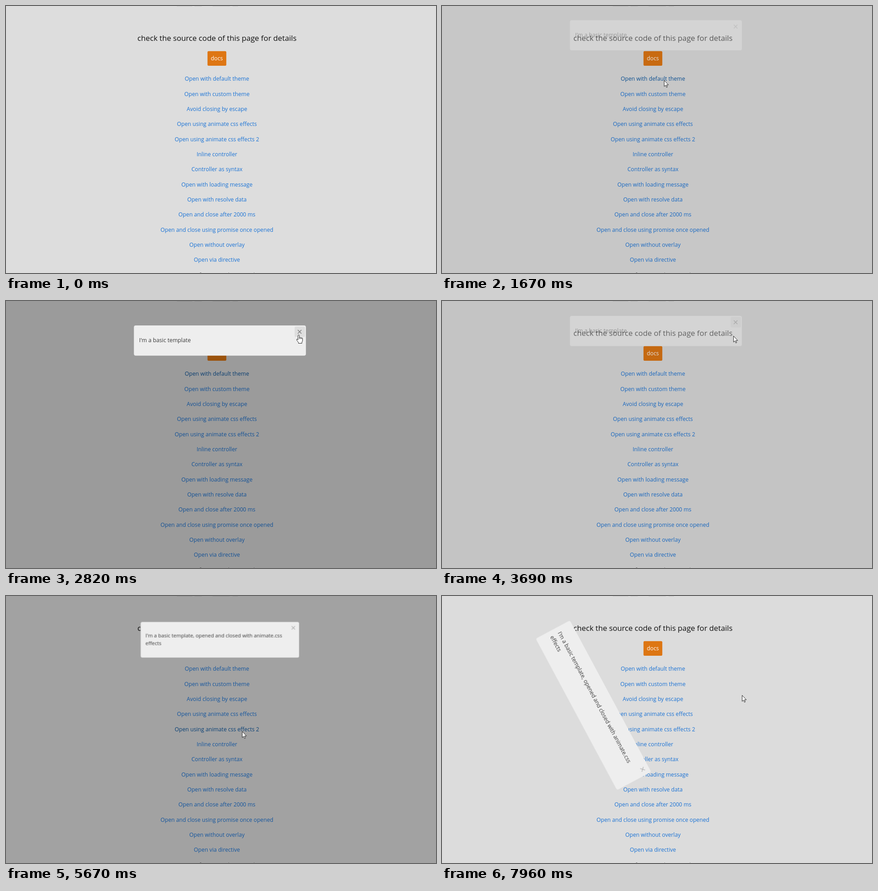
These frames come from a looping animation (949 px wide and 590 px high, 8 s). An HTML page:

```html
<!DOCTYPE html>
<html lang="en">
<head>
<meta charset="utf-8">
<title>Dialog demo</title>
<style>
  html, body { margin: 0; width: 100%; height: 100%; overflow: hidden; background: #ddd; }
  svg { display: block; width: 100%; height: 100%; }
  text { font: 12.2px "Open Sans", "Noto Sans", sans-serif; }
  .mid { text-anchor: middle; }
  .title { font-size: 16.76px; fill: #111; }
  .link { fill: #1c74d6; }
  .dialog, #shade, #hand, .lit { opacity: 0; }
  .dialog text { font-size: 12.28px; fill: #3a3a3a; }
  .panel { fill: #eee; }
  .cross { fill: none; stroke: #000; stroke-width: 1.4; stroke-opacity: .25; }
  #cursor { transform: translate(960px, 600px); }
  #cursor path { fill: #fff; stroke: #111; stroke-width: .9; stroke-linejoin: round; }
  #swing { transform-origin: 282.3px 54px; }
  #bounce { transform-origin: 472.1px 96.7px; }
</style>
</head>
<body>
<svg viewBox="0 0 949 590">
  <rect width="949" height="590" fill="#ddd"/>
  <path d="M377 .3h34M416 .3h16M456 .3h38M500 .3h12" stroke="#000" stroke-opacity=".13"/>
  <text class="mid title" x="465.6" y="77">check the source code of this page for details</text>
  <rect x="444.7" y="99.8" width="41.5" height="32.3" rx="2.5" fill="#de7613"/>
  <text class="mid" x="465.3" y="120" fill="#fff">docs</text>
  <g id="links"></g>
  <path d="M428 589.5h3M491 589.5h1M547 589.5h1" stroke="#333" stroke-opacity=".6"/>
  <rect id="shade" width="949" height="590"/>

  <g id="basic" class="dialog">
    <rect class="panel" x="282.3" y="54" width="379.6" height="66.8" rx="4"/>
    <text x="293.8" y="91.3">I'm a basic template</text>
  </g>

  <g id="swing">
    <g id="bounce" class="dialog">
      <rect class="panel" x="282.3" y="54" width="379.6" height="85.4" rx="4"/>
      <text x="293.8" y="91.3">I'm a basic template, opened and closed with animate.css</text>
      <text x="293.8" y="109.5">effects</text>
    </g>
  </g>

  <g id="cursor">
    <path id="arrow" d="M.4 .4V13.8L3.5 11 5.5 15.8 7.5 14.9 5.5 10.3H9.7Z"/>
    <path id="hand" d="M-1.6 11V1.5a1.5 1.3 0 0 1 3 0V6a1.4 1.2 0 0 1 2.5 .3a1.4 1.2 0 0 1 2.4 .5a1.3 1.2 0 0 1 2.2 1V12q0 2-1.5 4V18.5H-.6V16.5Q-3 13.5-4.6 11Q-5 9-3.4 9Q-2.5 9.3-1.6 11ZM1.4 6V9M3.9 6.4V9M6.3 7V9.2"/>
  </g>
</svg>
<script>
const LOOP = 8000;
const $ = id => document.getElementById(id);
const anims = [];

function add(parent, tag, attrs, text = '') {
  const el = document.createElementNS('http://www.w3.org/2000/svg', tag);
  for (const key in attrs) el.setAttribute(key, attrs[key]);
  el.textContent = text;
  return parent.appendChild(el);
}

// The easing applies to each step between two keyframes.
function play(el, frames, delay, duration, easing = 'ease', fill = 'forwards') {
  const anim = el.animate({ ...frames, easing }, { delay, duration, fill });
  anim.pause();
  anims.push(anim);
}

// Holds one value for a while, then lets go of it.
function during(el, from, to, prop, value) {
  play(el, { [prop]: [value, value] }, from, to - from, 'linear', 'none');
}

const links = [
  'Open with default theme', 'Open with custom theme', 'Avoid closing by escape',
  'Open using animate css effects', 'Open using animate css effects 2',
  'Inline controller', 'Controller as syntax', 'Open with loading message',
  'Open with resolve data', 'Open and close after 2000 ms',
  'Open and close using promise once opened', 'Open without overlay', 'Open via directive'
].map((label, i) => add($('links'), 'text',
  { class: 'mid link', x: 465.5, y: Math.round(165.4 + i * 100 / 3) }, label));

during(links[0], 880, 3360, 'fill', '#0d579f');
during(links[4], 4480, 6950, 'fill', '#0d579f');

function closeButton(dialog, from, to) {
  const cross = { class: 'cross', d: 'M644 64l8 8m0-8l-8 8' };
  add(dialog, 'path', cross);
  const lit = add(dialog, 'g', { class: 'lit' });
  add(lit, 'rect', { x: 637, y: 56.5, width: 23, height: 23, rx: 2.5, 'fill-opacity': .065 });
  add(lit, 'path', cross);
  during(lit, from, to, 'opacity', 1);
}
closeButton($('basic'), 2400, 4100);
closeButton($('bounce'), 6550, 7400);

// First dialog: flies in, flies out
const fly = ['translateY(-33.8px)', 'translateY(0px)'];
function flight(start, shade, opacity, transform) {
  play($('shade'), { opacity: shade }, start, 500);
  play($('basic'), { opacity, transform }, start, 500);
}
flight(1563, [0, .3], [0, 1], fly);
flight(3510, [.3, 0], [1, 0], [...fly].reverse());

// Second dialog: bounces in, then swings from its corner
const opens = 5058, closes = 7130, swing = 376;
play($('shade'), { opacity: [0, .3] }, opens, 1000);
play($('bounce'), { opacity: [0, 1] }, opens, 500);
play($('bounce'), {
  transform: ['scale(.3)', 'scale(1.05)', 'scale(.9)', 'scale(1)'],
  offset: [0, .5, .7, 1]
}, opens, 1000);
play($('shade'), { opacity: [.3, 0] }, closes, 1000);
play($('swing'), { transform: [0, 80, 60, 80].map(deg => `rotate(${deg}deg)`) },
  closes, 3 * swing, 'ease-in-out');

// Pointer: rests between a few moves
let spot = 'translate(960px, 600px)';
function move(from, to, x, y, easing = 'ease-in-out') {
  const next = `translate(${x}px, ${y}px)`;
  play($('cursor'), { transform: [spot, next] }, from, to - from, easing);
  spot = next;
}
move(80, 920, 490, 164, 'ease-out');
move(1800, 2440, 644, 82);
move(2500, 2820, 646, 75);
move(3550, 3690, 643, 77);
move(3850, 4490, 521, 299);
move(5840, 6570, 649, 70);
move(7250, 7960, 662, 219);

function point(from, to) {
  during($('hand'), from, to, 'opacity', 1);
  during($('arrow'), from, to, 'opacity', 0);
}
point(910, 1520);
point(2430, 3680);
point(4480, 4990);
point(6560, 7280);

const start = performance.now();
function draw() {
  const t = (performance.now() - start) % LOOP;
  for (const anim of anims) anim.currentTime = t;
  requestAnimationFrame(draw);
}
draw();
</script>
</body>
</html>
```
